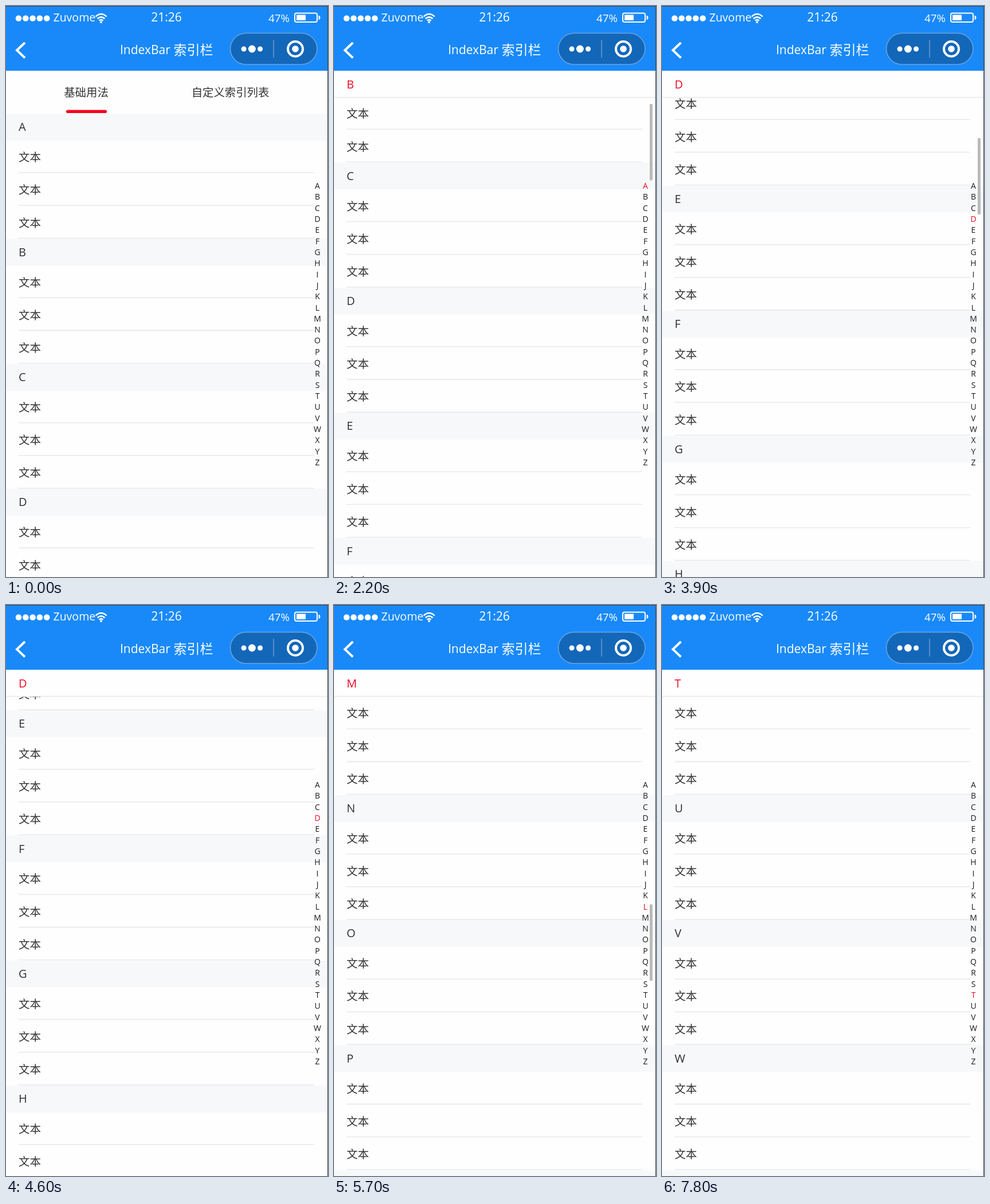
An HTML page for the animation above (8 s loop, 562x997 px).

```html
<!DOCTYPE html>
<html lang="zh">
<head>
<meta charset="utf-8">
<title>IndexBar 索引栏</title>
<style>
  html, body { margin: 0; width: 100%; height: 100%; overflow: hidden; background: #fefefe; }
  svg { display: block; width: 100%; height: 100%; }
  text { font-family: "Open Sans", "Noto Sans", sans-serif; fill: #323233; }
  .cjk { font-family: "Noto Sans CJK SC", "Noto Sans CJK", sans-serif; font-size: 19.4px; }
  .mid { text-anchor: middle; }
  .nav text { fill: #fff; }
  .head rect { fill: #f7f8fa; }
  .head text { font-size: 20px; }
  .head line { display: none; }
  .head.on rect { fill: #fefefe; }
  .head.on line { display: inline; }
  .head.on text, .index .on { fill: #ee0a24; }
  .index text { font-size: 14px; fill: #1c1c1d; }
  .rule { stroke: #e9ebee; stroke-width: 1.8; }
</style>
</head>
<body>
<svg id="stage" viewBox="0 0 562 997">
  <rect width="562" height="997" fill="#fefefe"/>
  <g id="page">
    <text class="cjk mid" x="140" y="158">基础用法</text>
    <text class="cjk mid" x="391.5" y="158">自定义索引列表</text>
    <rect x="105" y="181.5" width="71" height="5.6" rx="2.8" fill="#f5061f"/>
  </g>
  <g id="index" class="index mid"></g>
  <rect id="bar" x="551" width="5" height="133" fill="#bababa"/>
  <g class="nav">
    <rect width="562" height="113" fill="#1989fa"/>
    <g id="signal" fill="#fff"></g>
    <text x="82.5" y="27.3" font-size="19.5">Zuvome</text>
    <g fill="none" stroke="#fff" stroke-width="2.6">
      <path d="M156.5 18.5Q166 9.5 175.5 18.5"/>
      <path d="M159.7 22.3Q166 16.5 172.3 22.3"/>
      <path d="M162.6 25.6Q166 22.8 169.4 25.6"/>
    </g>
    <circle cx="166" cy="28.2" r="1.9" fill="#fff"/>
    <text class="mid" x="280" y="27.3" font-size="21">21:26</text>
    <text x="458" y="28" font-size="18.8">47%</text>
    <rect x="504" y="12.5" width="39" height="15.5" rx="3" fill="none" stroke="#fff" stroke-width="2"/>
    <rect x="507" y="15.5" width="16" height="9.5" fill="#fff"/>
    <path d="M545.5 16.5q3 .5 3 3.8t-3 3.8z" fill="#fff"/>
    <path d="M33 64L19 77.3L33 90.6" fill="none" stroke="#fff" stroke-width="4"/>
    <text x="199" y="84" font-size="21">IndexBar</text>
    <text class="cjk" x="292.5" y="85" style="font-size:23px;font-weight:500">索引栏</text>
    <rect x="391.5" y="47.5" width="151.5" height="54.5" rx="27.2" fill="#1367b9" stroke="#6aa4dc" stroke-width="1.6"/>
    <path d="M467 59V90" stroke="#5c95ce" stroke-width="1.8"/>
    <g fill="#fff">
      <circle cx="415" cy="75" r="4.5"/>
      <circle cx="429.3" cy="75" r="6.5"/>
      <circle cx="443.6" cy="75" r="4.5"/>
      <circle cx="505" cy="75" r="5.8"/>
    </g>
    <circle cx="505" cy="75" r="13" fill="none" stroke="#fff" stroke-width="4"/>
  </g>
  <path d="M0 .5H561.5V997" fill="none" stroke="#3d4650" stroke-width="1"/>
</svg>
<script>
const LOOP = 8000, STEP = 100;
const TOP = 188, NAV = 113.4, HEAD = 46.7, CELL = 57.2, SECTION = 218.4;
const STICK = TOP - NAV;
const letters = [...'ABCDEFGHIJKLMNOPQRSTUVWXYZ'];

// scroll moves: start, duration, target offset
const moves = [
  [1257, 300, 175.6],
  [1870, 300, 351.3],
  [2488, 400, 527],
  [3340, 150, 702.5],
  [3800, 300, 877.6],
  [5366, 300, STICK + 12 * SECTION],
  [6971, 300, STICK + 19 * SECTION]
];
// the side index follows late: time, letter
const marks = [[1900, 'A'], [2500, 'B'], [3400, 'C'], [3900, 'D'], [5600, 'L'], [7300, 'T']];

const $ = id => document.getElementById(id);
function add(parent, tag, attrs, text) {
  const el = document.createElementNS('http://www.w3.org/2000/svg', tag);
  for (const k in attrs) el.setAttribute(k, attrs[k]);
  if (text) el.textContent = text;
  return parent.appendChild(el);
}

for (let i = 0; i < 5; i++) add($('signal'), 'circle', { cx: 22 + 12.3 * i, cy: 21.5, r: 5.3 });

const page = $('page');
const sectionTop = i => TOP + SECTION * i;
letters.forEach((_, i) => {
  for (let j = 0; j < 3; j++) {
    const y = sectionTop(i) + HEAD + CELL * j;
    add(page, 'text', { class: 'cjk', x: 22, y: y + 36.4 }, '文本');
    add(page, 'line', { class: 'rule', x1: 22, x2: 538, y1: y + CELL - 1, y2: y + CELL - 1 });
  }
});
const heads = letters.map(c => {
  const g = add(page, 'g', { class: 'head' });
  add(g, 'rect', { width: 562, height: HEAD });
  add(g, 'line', { class: 'rule', x2: 562, y1: HEAD - .4, y2: HEAD - .4 });
  add(g, 'text', { x: 22, y: 30.2 }, c);
  return g;
});
const keys = letters.map((c, i) =>
  add($('index'), 'text', { x: 543.5, y: 319 + 19.32 * i }, c));

const ease = x => x * x * (3 - 2 * x);

function scrollAt(t) {
  let s = 0;
  for (const [start, dur, to] of moves) {
    if (t < start) break;
    s += (to - s) * ease(Math.min(1, (t - start) / dur));
  }
  return s;
}

function barOpacity(t) {
  const last = moves.filter(m => m[0] <= t).pop();
  if (!last) return 0;
  const idle = t - Math.ceil((last[0] + last[1]) / STEP) * STEP;
  if (idle < 300) return 1;
  return idle < 400 ? .65 : idle < 500 ? .3 : .03;
}

function activeHead(s, t) {
  if (t < 1500) return -1;
  return Math.max(0, Math.floor((s + HEAD + .5 - STICK) / SECTION));
}

function draw(time) {
  const t = Math.floor(time / STEP) * STEP;
  const s = scrollAt(t), active = activeHead(s, t);
  page.setAttribute('transform', `translate(0 ${-s})`);
  heads.forEach((g, i) => {
    let y = sectionTop(i);
    if (i === active) y = Math.max(y, s + NAV);
    if (i === active - 1) y = sectionTop(active) - HEAD;
    g.setAttribute('transform', `translate(0 ${y})`);
    g.classList.toggle('on', active >= 0 && (i === active || i === active - 1));
  });
  const mark = marks.filter(m => m[0] <= t).pop();
  keys.forEach((k, i) => k.classList.toggle('on', !!mark && mark[1] === letters[i]));
  $('bar').setAttribute('y', 118.6 + .15 * s);
  $('bar').setAttribute('opacity', barOpacity(t));
}

function tick() {
  draw(performance.now() % LOOP);
  requestAnimationFrame(tick);
}
document.querySelectorAll('.index text').forEach(k => k.setAttribute('text-anchor', 'middle'));
tick();
</script>
</body>
</html>
```
